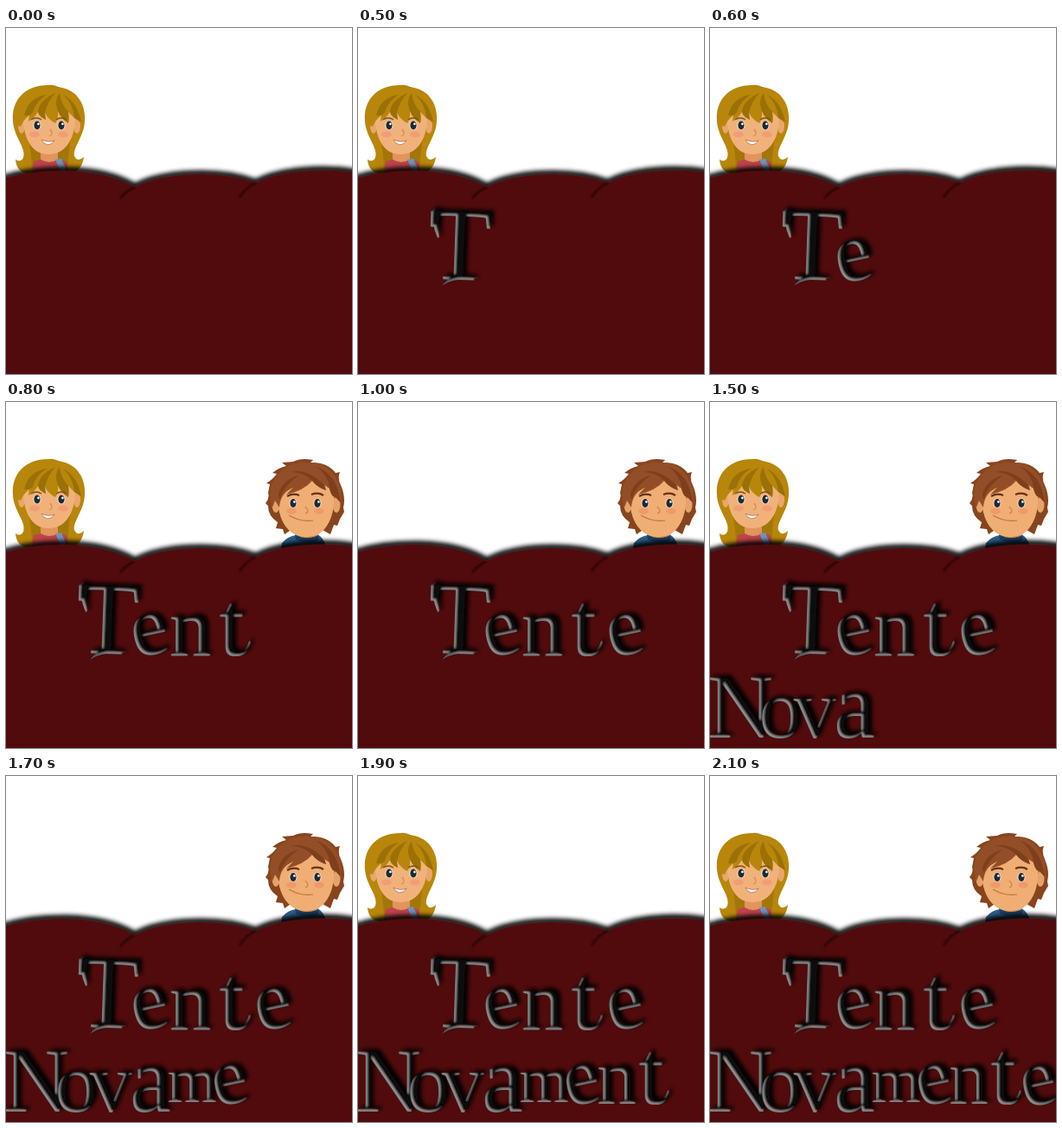
These frames come from a looping animation (400 by 400 pixels, 2200 ms). An HTML page:

```html
<!DOCTYPE html>
<html lang="pt">
<head>
<meta charset="utf-8">
<title>Tente Novamente</title>
<style>
  html, body { margin: 0; width: 100%; height: 100%; overflow: hidden; background: #fff; }
  svg { display: block; width: 100vw; height: 100vh; }
  text { font-family: "Liberation Serif", "Times New Roman", serif; text-anchor: middle; }
</style>
</head>
<body>
<svg viewBox="0 0 400 400">
  <defs>
    <filter id="soft" filterUnits="userSpaceOnUse" x="-20" y="100" width="440" height="320">
      <feGaussianBlur stdDeviation="2.4"/>
    </filter>
    <filter id="crease" filterUnits="userSpaceOnUse" x="-20" y="140" width="440" height="80">
      <feGaussianBlur stdDeviation="1"/>
    </filter>
    <!-- Dark metal lit from the lower left, with a shadow to the upper right -->
    <filter id="bevel" filterUnits="userSpaceOnUse" x="-10" y="190" width="420" height="220">
      <feGaussianBlur in="SourceAlpha" stdDeviation="2.6" result="blur"/>
      <feOffset in="blur" dx="4" dy="-3" result="shadow"/>
      <feOffset in="SourceAlpha" dx="2" dy="-1.8" result="moved"/>
      <feComposite in="SourceAlpha" in2="moved" operator="out" result="edge"/>
      <feGaussianBlur in="edge" stdDeviation="1" result="edgeSoft"/>
      <feFlood flood-color="#a0a0a0"/>
      <feComposite in2="edgeSoft" operator="in"/>
      <feComposite in2="SourceAlpha" operator="in" result="light"/>
      <feMerge>
        <feMergeNode in="shadow"/>
        <feMergeNode in="SourceGraphic"/>
        <feMergeNode in="light"/>
      </feMerge>
    </filter>
    <g id="eye">
      <ellipse rx="4.6" ry="5.4" fill="#f6e9df"/>
      <ellipse rx="3.6" ry="5" fill="#1d2a33"/>
      <circle cx="1.4" cy="-1.6" r="1.3" fill="#fff"/>
    </g>
    <path id="hills" d="M-9 176C35 161 108 159 149 184C180 166.500 248 163.500 289 179C318 164 368 161 409 168V409H-9Z"/>
  </defs>

  <g id="girl">
    <path fill="#b8860b" d="M49 66C22 66 6 83 8 108C9 126 24 139 20 150Q17 156 11 152Q12 166 24 168H76Q88 164 90 149Q83 156 79 148C77 138 90 126 91 108C93 84 77 69 61 69Q56 65 49 66Z"/>
    <path fill="#a3760a" d="M24 122Q30 140 30 168H71Q72 140 76 122Z"/>
    <path fill="#df955c" d="M40 138H60V154L50 159L40 154Z"/>
    <path fill="#bd444a" d="M32 154L40 152Q50 158 60 152L70 154L73 170H30Z"/>
    <path fill="#6e93bd" d="M57 152L64 151L71 168H64Z"/>
    <ellipse cx="18" cy="113" rx="4" ry="9" fill="#e9a66d"/>
    <ellipse cx="82" cy="113" rx="4" ry="9" fill="#e9a66d"/>
    <path fill="#f0b27a" d="M20 94C18 126 29 146 49 146C70 146 82 126 80 94L70 80H30Z"/>
    <g fill="#ee8d72" opacity=".5">
      <ellipse cx="33" cy="123" rx="6" ry="3.5"/>
      <ellipse cx="66" cy="123" rx="6" ry="3.5"/>
    </g>
    <path fill="#b8860b" d="M12 112C10 82 27 67 50 67C77 67 90 84 88 111Q84 107 79 104L72 97Q74 105 72 110Q64 105 60 96Q61 104 57 110Q49 106 45 98Q44 102 46 106Q38 103 37 97Q32 105 26 108L27 101Q20 106 17 114Z"/>
    <path fill="#9b7007" d="M21 101Q26 80 47 77Q34 85 31 98L27 101ZM37 97Q38 84 57 75Q48 85 45 98L46 106Q39 103 37 97ZM60 96Q55 84 62 75Q63 87 72 97L72 110Q63 104 60 96ZM79 104Q78 88 66 77Q83 86 87 109Z"/>
    <path fill="none" stroke="#7d5213" stroke-width="1.5" d="M29 106Q35 102 41 106M58 106Q64 102 70 106"/>
    <use href="#eye" x="36" y="112.500"/>
    <use href="#eye" x="64" y="112.500"/>
    <path fill="none" stroke="#d48b55" stroke-width="1.3" d="M51 117Q56 123 50 125"/>
    <path fill="#fff" stroke="#b3694b" stroke-width=".8" d="M41 129Q49 133 56 130Q53 135 48 135Q43 134 41 129Z"/>
  </g>

  <g id="boy">
    <path fill="#87451f" d="M324 74L319 70L332 69Q341 64 355 67L352 70Q371 69 381 82L386 81Q383 88 387 96Q393 110 390 122L391 127Q386 134 383 143L379 142L375 153L366 148H329L322 153L320 147L312 146L314 139Q303 132 303 120L300 117Q305 111 303 105L305 95L301 94Q309 89 313 83L308 82Q315 76 324 74Z"/>
    <path fill="#d28b55" d="M335 145H361V162H335Z"/>
    <path fill="#2d5d8a" d="M319 163Q326 155 335 154Q348 161 361 154Q367 156 371 170H318Z"/>
    <path fill="#1c4161" d="M334 153Q348 161 362 154L361 160Q347 165 335 159Z"/>
    <ellipse cx="312" cy="119" rx="4.500" ry="9" fill="#e7a269"/>
    <ellipse cx="382" cy="119" rx="4.500" ry="9" fill="#e7a269"/>
    <path fill="#f0ae75" d="M314 101C312 133 324 156 347 156C370 156 382 133 379 99L364 86H328Z"/>
    <g fill="#ee8668" opacity=".5">
      <ellipse cx="330" cy="126" rx="6" ry="3.5"/>
      <ellipse cx="362" cy="126" rx="6" ry="3.5"/>
    </g>
    <path fill="#944e27" d="M308 122Q301 99 314 84Q329 67 352 70Q377 70 387 99L388 118L381 110Q376 110 374 100L368 96L370 102Q359 98 354 91Q345 102 324 107L332 99Q317 105 316 122L311 114Z"/>
    <path fill="#7e3f1d" d="M315 106Q320 89 339 85Q323 94 316 113ZM354 91Q344 81 329 81Q348 76 368 96L370 102Q360 99 354 91ZM374 100Q373 85 359 75Q382 82 387 116L381 110Q376 109 374 100Z"/>
    <path fill="none" stroke="#673214" stroke-width="2.2" d="M325 109Q332 105 339 108M353 107Q361 104 367 108"/>
    <use href="#eye" x="332" y="117"/>
    <use href="#eye" x="360" y="117"/>
    <path fill="none" stroke="#cf824c" stroke-width="1.3" d="M346 121Q352 127 346 129"/>
    <path fill="none" stroke="#c0703f" stroke-width="1.2" d="M327 131Q340 139 355 137"/>
  </g>

  <use href="#hills" y="-1" fill="none" stroke="#000" stroke-width="7" filter="url(#soft)"/>
  <use href="#hills" fill="#520b0c"/>
  <path fill="none" stroke="#1c0304" stroke-width="1.8" filter="url(#crease)" d="M149 184Q138 189 132 197M289 179Q277 184 270 196"/>
  <g id="words"></g>
</svg>
<script>
const LOOP = 2200, HOLD = 500, STEP = 100;
const byId = id => document.getElementById(id);

// character, centre x, baseline, size, tilt, swash
const letters = [
  ["T", 117, 291, 120, 2, "M87 209Q84 224 92 243L94 242Q91 224 97 212ZM97 298Q105 287 116 287L140 289Q124 291 116 291Q106 292 97 298Z"],
  ["e", 166, 292, 98, -12],
  ["n", 213, 293, 98, 0],
  ["t", 261, 293, 106, 0, "M264 291Q277 291 281 276L283 277Q280 294 266 294Z"],
  ["e", 309, 292, 98, -12],
  ["N", 35, 388, 106, 0],
  ["o", 81, 388, 98, 0],
  ["v", 121, 388, 98, 0],
  ["a", 167, 388, 108, 0],
  ["m", 215, 377, 74, 0],
  ["e", 259, 379, 94, -12],
  ["n", 299, 379, 92, 0],
  ["t", 339, 379, 106, 0, "M342 377Q354 378 358 363L360 364Q357 381 344 380Z"],
  ["e", 380, 380, 94, -12]
];

const glyphs = letters.map(([char, x, y, size, tilt, swash]) => {
  const midY = y - size * .23;
  byId("words").insertAdjacentHTML("beforeend", `<g filter="url(#bevel)" fill="#0d0708">
    <text x="${x}" y="${y}" font-size="${size}" transform="rotate(${tilt} ${x} ${midY})">${char}</text>
    ${swash ? `<path d="${swash}"/>` : ""}</g>`);
  return byId("words").lastElementChild;
});

const show = (el, on) => el.style.display = on ? "" : "none";

let last = -1;
function draw() {
  const time = performance.now() % LOOP;
  const step = time < HOLD ? 0 : Math.floor((time - HOLD) / STEP) + 1;
  if (step !== last) {
    last = step;
    // Typing pauses for two steps between the words
    const typed = step < 8 ? Math.min(step, 5) : step - 2;
    glyphs.forEach((el, i) => show(el, i < typed));
    const phase = step % 7;
    show(byId("girl"), phase < 6);
    show(byId("boy"), phase > 2);
  }
  requestAnimationFrame(draw);
}
draw();
</script>
</body>
</html>
```
